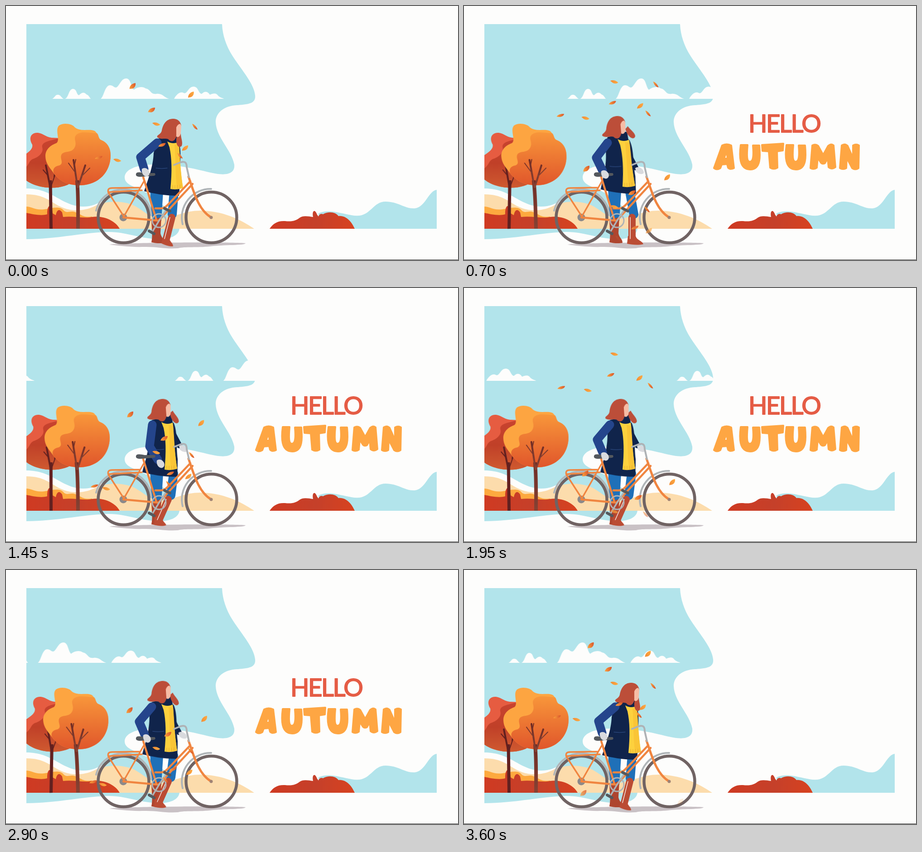
Recreate the animation shown at these times as an HTML page. Size 998 by 561 pixels, loop 3650 ms.

```html
<!DOCTYPE html>
<html lang="en">
<head>
<meta charset="utf-8">
<title>Hello Autumn</title>
<style>
html, body { margin: 0; width: 100%; height: 100%; overflow: hidden; background: #fdfdfc; }
svg { display: block; width: 998px; height: 561px; }
.line { fill: none; stroke-linecap: round; stroke-linejoin: round; }

.title { animation: fade 3650ms linear infinite; }
@keyframes fade { 0%, 3%, 96%, 100% { opacity: 0 } 14%, 85% { opacity: 1 } }

.clouds { animation: drift 3650ms linear infinite; }
@keyframes drift { 19.18% { transform: translateX(126px) } 100% { transform: translateX(695px) } }

.tree { animation: sway 912.5ms cubic-bezier(.37,0,.63,1) infinite alternate; }
.tree.orange { transform-origin: 159px 492px; --lean: 1.9deg; }
.tree.red { transform-origin: 99px 492px; --lean: -1.9deg; }
@keyframes sway { to { transform: skewX(var(--lean)) } }

.pose { animation: 3650ms ease-in-out infinite; }
.head { animation-name: head; transform-origin: 368px 285px; }
@keyframes head {
  0%, 98.63%, 100% { transform: none }
  19.18% { transform: translate(-29px,-6px) rotate(-5deg) }
  39.73%, 79.5% { transform: translate(-22px,-4px) rotate(-4deg) }
  89.04% { transform: translate(-19px,-1px) rotate(-4deg) }
}
.lock { animation-name: lock; transform-origin: 383px 290px; }
@keyframes lock {
  0%, 98.63%, 100% { transform: none }
  19.18% { transform: translate(10px,-8px) rotate(-28deg) }
  39.73%, 79.5%, 89.04% { transform: translate(8px,-5px) rotate(-22deg) }
}
.coat { animation-name: coat; transform-origin: 340px 412px; }
@keyframes coat {
  0%, 98.63%, 100% { transform: none }
  19.18% { transform: translate(-3px,-4px) skewX(6.5deg) }
  39.73%, 79.5% { transform: translate(-4px,-2px) skewX(3.5deg) }
  89.04% { transform: translate(-2px,0) skewX(4.5deg) }
}
.scarf { animation-name: scarf; transform-origin: 375px 405px; }
@keyframes scarf {
  0%, 98.63%, 100% { transform: none }
  19.18% { transform: translate(-13px,-5px) skewX(2deg) }
  39.73%, 79.5% { transform: translate(-13px,-3px) }
  89.04% { transform: translate(-8px,-1px) }
}
.arm { animation-name: arm; d: path("M334 302L297 334L305 360"); }
@keyframes arm {
  0%, 98.63%, 100% { d: path("M334 302L297 334L305 360") }
  19.18% { d: path("M317 302L292 335L306 364") }
  39.73% { d: path("M323 302L317 350L335 379") }
  53.42%, 79.5% { d: path("M322 302L294 335L306 363") }
  89.04% { d: path("M324 304L294 334L305 363") }
}
.hand { animation-name: hand; }
@keyframes hand {
  0%, 98.63%, 100% { transform: translate(308px,367px) }
  19.18%, 53.42%, 79.5%, 89.04% { transform: translate(311px,372px) }
  39.73% { transform: translate(341px,388px) }
}
.reach { animation-name: reach; }
@keyframes reach {
  0%, 98.63%, 100% { transform: translate(-22px,-6px) }
  19.18%, 89.04% { transform: translate(0,0) }
  39.73%, 53.42% { transform: translate(4px,-9px) }
  68.49% { transform: translate(6px,3px) }
}
.thigh { animation-name: thigh; d: path("M371 410L367 460"); }
@keyframes thigh {
  0%, 98.63%, 100% { d: path("M371 410L367 460") }
  19.18% { d: path("M366 410L375 460") }
  39.73%, 79.5% { d: path("M370 410L364 458") }
  89.04% { d: path("M369 410L372 460") }
}
.shaft { animation-name: shaft; d: path("M366 467L354 514"); }
@keyframes shaft {
  0%, 98.63%, 100% { d: path("M366 467L354 514") }
  19.18% { d: path("M371 467L371 514") }
  39.73%, 79.5% { d: path("M358 467L338 512") }
  89.04% { d: path("M370 467L364 514") }
}
.foot { animation-name: foot; }
@keyframes foot {
  0%, 98.63%, 100% { transform: translate(353px,516px) rotate(12deg) scaleX(.75) }
  19.18% { transform: translate(371px,515px) }
  39.73%, 79.5% { transform: translate(335px,513px) scaleX(.75) }
  89.04% { transform: translate(363px,516px) rotate(4deg) scaleX(.95) }
}
</style>
</head>
<body>
<svg viewBox="0 0 998 561" role="img" aria-label="Hello Autumn">
  <defs>
    <clipPath id="frame"><path d="M45 0H998V561H45Z"/></clipPath>
    <linearGradient id="canopy" x2="0" y2="1"><stop stop-color="#f8963a"/><stop offset="1" stop-color="#e0562b"/></linearGradient>
    <linearGradient id="redCanopy" x2="0" y2="1"><stop stop-color="#c8432f"/><stop offset=".5" stop-color="#c04028"/><stop offset="1" stop-color="#cf5a30"/></linearGradient>
    <linearGradient id="bush"><stop stop-color="#cf3a22"/><stop offset=".55" stop-color="#c5402a"/><stop offset="1" stop-color="#d8421f"/></linearGradient>
    <linearGradient id="trunk" x2="0" y2="1"><stop stop-color="#6e2a23"/><stop offset="1" stop-color="#864334"/></linearGradient>
    <linearGradient id="rust"><stop stop-color="#fba33e"/><stop offset="1" stop-color="#d9542b"/></linearGradient>
    <linearGradient id="gold"><stop stop-color="#f28c33"/><stop offset="1" stop-color="#fdaa43"/></linearGradient>
    <path id="leaf" d="M-9 3C-6 -4 2 -6 8 -4C6 3 0 6 -6 3.5Z"/>
    <path id="letterU" d="M611 307H626C624 330 624 344 631 344C639 344 640 330 638 308H652C654 330 656 361 632 361C607 361 608 330 611 307Z"/>
    <g id="cloudRow">
      <path d="M102 205C108 202 108 196 114 196C121 196 121 202 127 205Z"/>
      <path d="M130 205C138 203 138 184 147 183C157 183 155 196 161 197C168 190 173 190 177 195C183 197 184 202 187 205Z"/>
      <path d="M209 205C216 200 218 176 229 175C238 175 240 184 246 178C253 170 256 160 265 160C276 160 275 178 282 185C290 178 302 177 308 182C320 184 318 196 332 194C345 192 350 203 360 205Z"/>
      <path d="M371 205C376 195 385 188 392 192C400 196 402 178 414 178C425 178 424 193 432 194C440 186 446 190 450 196C458 192 465 192 468 198C474 203 478 203 481 205Z"/>
    </g>
  </defs>
  <rect width="998" height="561" fill="#fdfdfc"/>

  <!-- sky -->
  <g fill="#b2e4eb">
    <path d="M45 40H477C478 64 486 88 500 110C520 141 548 172 550 197C552 215 537 217 512 219C480 220 463 237 463 256C464 290 498 318 504 350C506 369 490 375 462 370C430 364 390 350 330 350C285 350 262 362 262 379C263 400 298 399 327 424C358 449 384 470 383 492C380 512 352 517 322 514C285 510 260 498 222 499C165 501 120 514 45 515Z"/>
    <path d="M690 458C718 445 752 465 780 463C806 460 812 432 838 432C866 432 880 448 902 447C926 445 933 408 951 406V492H690Z"/>
  </g>
  <g clip-path="url(#frame)">
    <g class="clouds" fill="#fdfdfc"><use href="#cloudRow"/><use href="#cloudRow" x="-689"/></g>
  </g>

  <!-- hills -->
  <path d="M45 403C104 403 122 442 170 443C190 443 200 437 214 430L250 492H45Z" fill="#fdfdfc"/>
  <path d="M45 416C85 416 97 432 120 443C145 455 172 453 194 443C216 431 246 429 274 437C300 446 312 468 345 470C378 464 396 452 428 452C476 452 516 470 548 492H45Z" fill="#fcdcac"/>
  <path d="M45 443C57 443 65 452 85 449C102 446 118 442 126 450C134 460 141 451 152 455C166 459 168 468 190 465V492H45Z" fill="#fda93f"/>
  <path d="M45 457C60 460 78 464 91 460C90 438 101 434 103 458L110 462C112 450 118 447 124 456L126 466C150 463 172 470 190 466C214 462 242 474 251 492H45Z" fill="url(#bush)"/>
  <path d="M582 492C590 480 600 474 616 475C632 477 640 474 648 468C656 462 668 465 678 466C675 452 682 447 687 461L690 465C692 458 698 459 700 460C712 453 728 455 734 464C752 462 764 478 770 492Z" fill="url(#bush)"/>

  <!-- trees -->
  <g clip-path="url(#frame)">
    <g class="tree red">
      <path d="M36 332C52 322 60 315 58 306C50 292 54 281 68 280C82 280 88 291 104 291L125 292L150 300V385C130 408 65 408 36 378Z" fill="#e65c41"/>
      <path d="M118 292C95 298 78 300 80 312C84 325 70 334 62 337C48 341 54 352 36 362V378C65 408 130 408 150 385V300Z" fill="url(#redCanopy)"/>
      <g class="line" stroke="#62201f"><path d="M99.500 492L98 385" stroke-width="7" stroke-linecap="butt"/><path d="M98 402L88 352" stroke-width="4"/><path d="M99 400L111 365M93 375L82 362M106 378L109 350" stroke-width="2"/></g>
    </g>
    <g class="tree orange">
      <path d="M87 330C88 315 100 307 111 303C121 297 107 274 117 264C127 257 146 260 152 268C165 279 185 270 196 276C204 282 201 292 210 296C225 302 231 315 231 330C231 366 205 395 165 396C130 396 118 384 107 372C98 357 87 350 87 330Z" fill="#fda541"/>
      <path d="M201 281C180 280 164 275 154 286C148 294 159 303 150 315C143 324 132 320 124 326C116 335 130 347 118 352C106 354 101 362 107 372C118 384 130 396 165 396C205 395 231 366 231 330C231 315 225 302 210 296C204 293 205 285 201 281Z" fill="url(#canopy)"/>
      <g class="line" stroke="url(#trunk)"><path d="M159 492C159 455 160 420 157 385" stroke-width="8" stroke-linecap="butt"/><path d="M158 400L149 340M159 400L175 352" stroke-width="4"/><path d="M153 368L138 347M167 376L185 358M151 352L154 339" stroke-width="2"/></g>
    </g>
  </g>

  <path d="M228 527C270 522 500 521 529 524C528 529 480 527 450 531C422 534 395 531 380 535C350 537 332 531 304 532C275 533 248 529 228 527Z" fill="#c9c1c5"/>

  <!-- cyclist -->
  <path d="M318 405L347 410L343 474L326 490L321 455Z" fill="#1f70b8"/>
  <path class="pose thigh line" stroke="#1f70b8" stroke-width="20"/>
  <path d="M321 473L343 466L341 502C343 512 350 515 350 523C342 525 330 524 321 522C324 508 322 495 321 473Z" fill="#ae452f"/>
  <g fill="#bb4c34">
    <path class="pose shaft line" style="fill:none" stroke="#bb4c34" stroke-width="16"/>
    <path class="pose foot" d="M-9 -7L8 -7C10 2 23 4 25 11C12 14 0 12 -11 10Z"/>
    <path class="pose shaft line" style="fill:none" stroke="#f5e9e4" stroke-width="1.500" transform="translate(-4)"/>
  </g>
  <g class="pose reach"><path d="M362 325L379 357" class="line" stroke="#10244b" stroke-width="12"/><path d="M378 358C385 352 397 360 397 368C395 373 386 372 380 366Z" fill="#d9dade"/></g>
  <g class="pose coat">
    <path d="M333 294C345 289 372 292 381 300C389 320 383 350 385 380L382 419C350 419 325 414 305 409C313 385 325 355 326 325Z" fill="#10244b"/>
    <path d="M358 282H378L379 304H360Z" fill="#10244b"/>
    <path d="M331 358Q344 360 356 358" class="line" stroke="#35558f" stroke-width="1"/>
  </g>
  <g class="pose scarf">
    <path d="M356 299C364 304 374 304 381 300L382 307C384 340 385 365 391 402C383 405 372 406 363 404C367 365 366 335 361 312Z" fill="#fdd13e"/>
    <path d="M372 306C375 340 373 370 378 404L391 402C385 365 385 340 382 307Z" fill="#fac536"/>
    <path d="M368 396V404M373 396V405M378 396V404M384 395V403" class="line" stroke="#e3aa2c" stroke-width="1"/>
  </g>
  <g class="pose head" fill="#bc4e39">
    <path class="pose lock" d="M378 284C372 303 380 317 388 309C391 300 386 292 386 282Z"/>
    <path d="M369 249C353 249 346 263 344 275C342 285 332 284 334 290C342 296 350 291 358 294C364 301 371 300 375 291L387 264C385 254 378 249 369 249Z"/>
    <path d="M376 268C380 259 386 258 387 265L386 279C386 287 380 292 376 288Z" fill="#f6bca5"/>
  </g>
  <path class="pose arm line" stroke="#24458c" stroke-width="19"/>

  <!-- bicycle -->
  <g class="line">
    <g stroke="#b0b5b8" stroke-width="4"><path d="M199 452A62 62 0 0 1 321 462"/><path d="M390 482A63 63 0 0 1 453 404"/></g>
    <g stroke="#706363" stroke-width="6.500"><circle cx="259.500" cy="467" r="56"/><circle cx="453.500" cy="467" r="56"/></g>
    <circle cx="259" cy="467" r="8.500" fill="#8b898a"/>
    <g stroke="#f08540">
      <path d="M303 378L332 472M259 467L336 474M412 393L338 473M330 447H342C352 447 358 438 366 430L407 387" stroke-width="4.500"/>
      <path d="M259 467L304 388M261 466L226 412C224 405 227 402 234 402L296 401M228 411L300 407" stroke-width="3.500"/>
      <path d="M403 377C414 408 424 450 453 467" stroke-width="5"/>
    </g>
    <circle cx="453" cy="467" r="3.500" fill="#a08374"/>
    <path d="M371 351L386 345C397 342 399 348 399 356L404 378" stroke="#aeb2b5" stroke-width="4"/>
    <circle cx="338" cy="474" r="15" stroke="#aeb2b5" stroke-width="3"/>
    <path d="M354 450L338 474L323 499" stroke="#aeb2b5" stroke-width="3.500"/>
    <path d="M350 447L362 453M316 497L327 503" stroke="#55595d" stroke-width="6"/>
  </g>
  <path d="M287 371C288 366 296 367 306 369L328 369C331 371 330 375 326 375L300 377C291 378 286 376 287 371Z" fill="#54585d"/>
  <path class="pose hand" d="M-8 -7C-2 -12 5 -8 8 -2C11 6 5 11 0 9C-6 7 -9 0 -8 -7Z" fill="#d9dade"/>

  <g class="title">
    <text x="628" y="279" font-family="Lato, sans-serif" font-size="54.500" letter-spacing="-2.500" fill="#e55c45" stroke="#e55c45" stroke-width="1.900" stroke-linejoin="round">HELLO</text>
    <g fill="#fea643" stroke="#fea643" stroke-width="4" stroke-linejoin="round" fill-rule="evenodd">
      <path d="M552 358L570 308Q580 303 590 308L596 358Q588 362 583 357L581 349L569 350L566 358Q558 363 552 358ZM574 337L580 320L582 337Z"/>
      <use href="#letterU"/>
      <path d="M658 307L705 304L704 319L691 321L692 357Q684 362 676 357L673 321L659 320Z"/>
      <use href="#letterU" x="101"/>
      <path d="M765 358L769 308Q776 304 782 309L793 329L804 309Q811 303 816 308L820 356Q812 362 805 356L803 336L797 347Q792 350 788 346L781 335L779 357Q772 362 765 358Z"/>
      <path d="M830 358L834 308Q841 303 847 309L859 336L859 308Q866 304 872 308L871 358Q864 363 857 358L845 335L844 358Q837 362 830 358Z"/>
    </g>
  </g>

  <g id="leaves"></g>
  <rect y="560" width="998" height="1" fill="#3b3b3a"/>
</svg>
<script>
const LOOP = 3650, SPEED = 0.261;
// Moments at which each gust of leaves passes its reference height
const gusts = [0, 1057, 2390, 3640];
// x, y, sideways drift, first visible fall offset, angle, thickness, fill
const kinds = [
  [280, 177, -0.05, -50, -20, 1.1, 'rust'],
  [409, 196, 0.22, -50, -25, 1, 'gold'],
  [322, 230, 0.27, -60, -10, 1, 'rust'],
  [332, 261, 0, -140, 28, .75, 'gold'],
  [417, 267, -0.07, -110, 58, .55, 'rust'],
  [345, 307, 0.18, -135, -8, .75, 'rust'],
  [396, 314, 0.07, -135, -22, .9, 'gold'],
  [384, 331, -0.24, -135, 58, .55, 'rust'],
  [205, 335, -0.09, -135, -4, .7, 'rust'],
  [246, 341, -0.24, -135, 28, .75, 'gold']
];
const clamp = v => Math.max(0, Math.min(1, v));
const layer = document.getElementById('leaves');
const leaves = gusts.flatMap(at => kinds.map(kind => {
  const el = document.createElementNS('http://www.w3.org/2000/svg', 'use');
  el.setAttribute('href', '#leaf');
  el.setAttribute('fill', `url(#${kind[6]})`);
  layer.append(el);
  return { el, at, kind };
}));

let start;
function draw(now) {
  start ??= now;
  const t = (now - start) % LOOP;
  for (const { el, at, kind: [x, y, drift, first, angle, thick] } of leaves) {
    const fall = (t - at) * SPEED;
    const top = y + fall;
    const alpha = clamp((fall - first) / 15) * clamp((517 - top) / 32);
    el.setAttribute('opacity', alpha);
    el.setAttribute('transform', `translate(${x + drift * fall} ${top}) rotate(${angle}) scale(1 ${thick})`);
  }
  requestAnimationFrame(draw);
}
requestAnimationFrame(draw);
</script>
</body>
</html>
```
